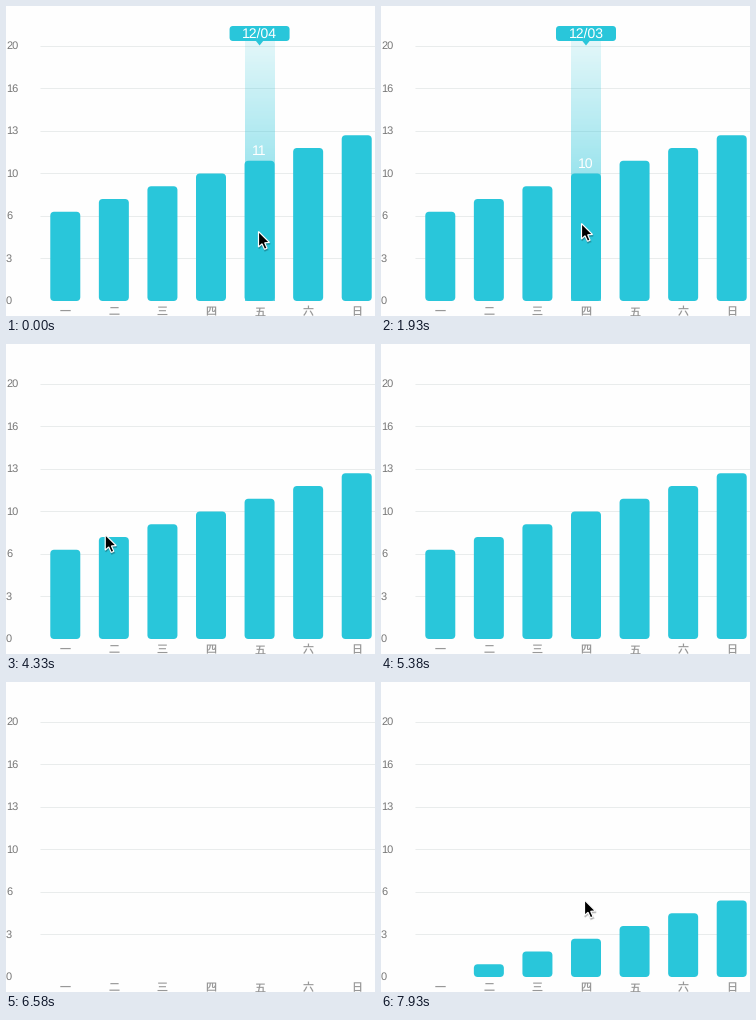
These frames come from a looping animation (369x310 px, 8 s). A matplotlib script:

```python
import numpy as np
import matplotlib.pyplot as plt
from matplotlib.animation import FuncAnimation
from matplotlib.colors import LinearSegmentedColormap, to_rgba
from matplotlib.patches import FancyBboxPatch, Polygon

W, H, DPI = 369, 310, 100
LOOP, STEP = 8000, 20
HOLD, SHIFT = 150, 20  # the picture only changes every HOLD ms
PX = 72 / DPI
CYAN = "#29c6da"
LEFT, TOP, BASE, BAR_W = 35, 40, 295, 30
UNIT = (BASE - TOP) / 20
DAYS = np.arange(7)
CENTERS = LEFT + 340 / 7 * (DAYS + 0.5)

plt.rcParams.update({"font.family": "Liberation Sans", "text.hinting": "none"})
fig = plt.figure(figsize=(W / DPI, H / DPI), dpi=DPI, facecolor="#fefefe")
ax = fig.add_axes([0, 0, 1, 1])
ax.axis("off")


def label(x, y, s, size, color, ha="center", **kw):
    return ax.text(x, y, s, fontsize=size * PX, color=color, ha=ha,
                   va="center", **kw)


def rounded(x, y, w, h, r, **kw):
    style = f"round,pad=0,rounding_size={r}"
    return ax.add_patch(FancyBboxPatch((x, y), w, h, boxstyle=style,
                                       fc=CYAN, ec="none", **kw))


def ramp(t, start, end):
    return np.clip((t - start) / (end - start), 0, 1)


def smooth(k):
    return k * k * (3 - 2 * k)


# Axes
for i in range(7):
    y = TOP + (BASE - TOP) / 6 * i
    label(0, y + 0.5, 20 * (6 - i) // 6, 11, "#777777", ha="left")
    if i < 6:
        ax.plot([LEFT, W], [int(y) + 0.5] * 2, color="#e9ecec", lw=PX,
                snap=False, zorder=1)
for x, day in zip(CENTERS, "一二三四五六日"):
    label(x, 306, day, 11, "#989898", family="Noto Sans CJK JP")

bars = [rounded(x - BAR_W / 2, BASE - 1, BAR_W, 1, 0.5, zorder=3)
        for x in CENTERS]

# Hover column and tooltip
fade = LinearSegmentedColormap.from_list(
    "fade", [to_rgba(CYAN, 0.13), to_rgba(CYAN, 0.78)])
column = ax.imshow(np.linspace(0, 1, 260)[:, None], cmap=fade, aspect="auto",
                   extent=(0, BAR_W, BASE, 35), zorder=2)
bubble = rounded(0, 20, 60, 15, 3.5, zorder=5)
pointer = ax.add_patch(Polygon([(0, 0)] * 3, fc=CYAN, ec="none", zorder=5))
date = label(0, 0, "", 14, "white", zorder=6)
value = label(0, 0, "", 14, "white", zorder=6)
tip_parts = (column, bubble, pointer, date, value)

# Mouse arrow
ARROW = np.array([(0, 0), (0, 15.5), (3.5, 12.3), (6, 17.8), (8.6, 16.7),
                  (6.2, 11.3), (11, 11)])
shadow = ax.add_patch(Polygon(ARROW, fc="black", ec="black", lw=1.6 * PX,
                              alpha=0.18, zorder=8))
arrow = ax.add_patch(Polygon(ARROW, fc="black", ec="white", lw=1.2 * PX,
                             joinstyle="miter", zorder=9))
ax.set_xlim(0, W)
ax.set_ylim(H, 0)

# Each glide: arrival time, number of steps, goal
START = np.array((252.5, 225.5))
GLIDES = ((880, 6, (200.5, 217.5)),
          (2680, 3, (273, 186.5)),
          (3430, 4, (65, 194)),
          (4630, 3, (197, 181)),
          (5380, 2, (-130, 200)),
          (7480, 3, (172.5, 207.5)),
          (7930, 2, (203.5, 218)))

# Each hover: bar, first and last moment
HOVERS = (4, -400, 430), (3, 1480, 2530), (3, 4780, 5380)
FADE = 300


def bar_values(t):
    last_week = (DAYS + 7) * (1 - ramp(t, 5980, 6580))
    this_week = DAYS * (1 - (1 - ramp(t, 6580, 7480)) ** 3)
    return last_week + this_week


def draw_bars(values):
    for bar, x, h in zip(bars, CENTERS, values * UNIT):
        bar.set_visible(h > 0.3)
        bar.set_bounds(x - BAR_W / 2, BASE - h, BAR_W, h)
        bar.set_boxstyle("round", pad=0, rounding_size=min(4, h / 2))


def draw_tip(t, values):
    shown = [hover for hover in HOVERS if hover[1] < t < hover[2]]
    for part in tip_parts:
        part.set_visible(bool(shown))
    if not shown:
        return
    bar, start, end = shown[0]
    opening = ramp(t, start, start + FADE)
    for part in tip_parts:
        part.set_alpha(min(opening, 1 - ramp(t, end - FADE, end)))
    x, top = CENTERS[bar], 20 - 8 * (1 - opening)
    left = round(x - BAR_W / 2)
    column.set_extent((left, left + BAR_W, BASE, 35))
    bubble.set_bounds(x - 30, top, 60, 15)
    pointer.set_xy([(x - 4, top + 14.5), (x + 4, top + 14.5), (x, top + 19.5)])
    date.set_text(f"12/{bar:02d}")
    date.set_position((x, top + 8.6))
    value.set_text(f"{values[bar]:.0f}")
    value.set_position((x, BASE - values[bar] * UNIT - 9))


def draw_arrow(t):
    tip = START
    for end, steps, goal in GLIDES:
        tip = tip + (goal - tip) * smooth(ramp(t, end - steps * HOLD, end))
    arrow.set_xy(ARROW + tip)
    shadow.set_xy(ARROW + tip + (0.5, 1.5))


def update(i):
    t = i * STEP + STEP // 2
    t = (t + SHIFT) // HOLD * HOLD - SHIFT
    values = bar_values(t)
    draw_bars(values)
    draw_tip(t, values)
    draw_arrow(t)
    return []


anim = FuncAnimation(fig, update, frames=LOOP // STEP, interval=STEP,
                     repeat=True, repeat_delay=0)
plt.show()
```
